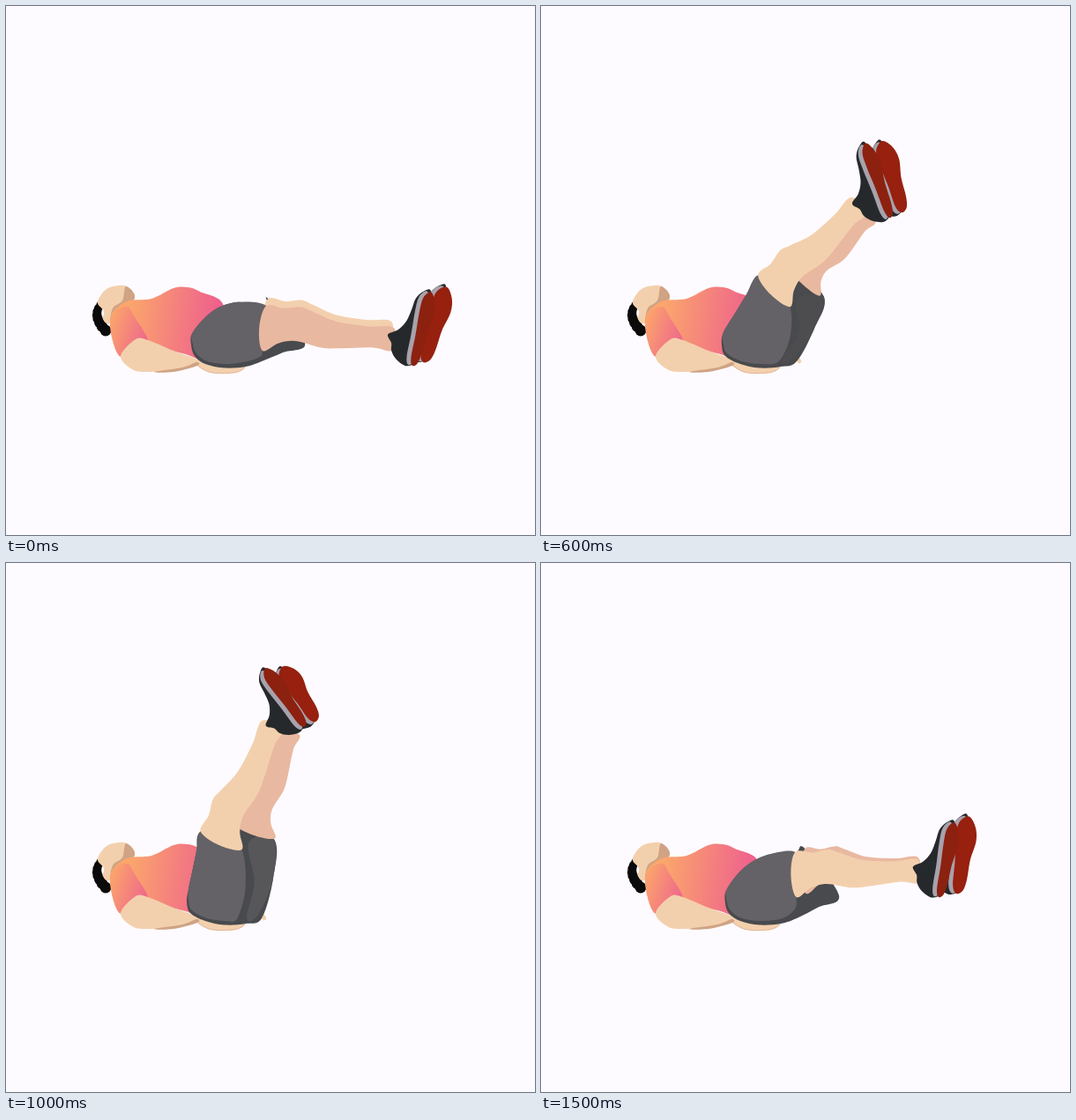
Write an HTML page with a canvas that moves like this. It is 600 px wide and 600 px high and loops after 1600 ms.

```html
<!DOCTYPE html>
<html lang="en">
<head>
<meta charset="utf-8">
<title>Lying leg raise</title>
<style>
html, body { margin: 0; width: 100%; height: 100%; overflow: hidden; background: #fdfbff; }
canvas { display: block; width: 600px; height: 600px; }
</style>
</head>
<body>
<canvas id="stage" width="600" height="600"></canvas>
<script>
const ctx = document.getElementById('stage').getContext('2d');
const SKIN = '#f3d0ad', BLUSH = '#e9b8a0', SHADE = '#cfa384', KNUCKLE = '#dba886';
const CLOTH = '#646267', INK = '#26292b', MIDSOLE = '#a7a2ac';
const LOOP = 1600, STEP = 100;

const pts = text => text.split(' ').map(p => p.split(',').map(Number));
const lerp = (a, b, k) => a + (b - a) * k;
const along = (p, q, k) => p.map((v, i) => lerp(v, q[i], k));
const shift = ([x, y], dx, dy) => [x + dx, y + dy];

// Joints of each pose; everything below the waist is built from these.
const flat = {
  near: BLUSH, far: SKIN, angle: 0, shade: 73,
  hem: [293, 366], farHem: [295, 358], farAnkle: [436, 371], tip: [339, 382],
  toe: [480, 324], heel: [461, 408], farToe: [497, 318], farHeel: [473, 404]
};
const low = {
  near: SKIN, far: BLUSH, angle: 9, shade: 73,
  hem: [289, 354], farHem: [300, 350], farAnkle: [428, 347], tip: [338, 377],
  toe: [467, 294], heel: [451, 379], farToe: [482, 287], farHeel: [471, 375]
};
const mid = {
  near: SKIN, far: BLUSH, angle: 38, shade: 84,
  hem: [274, 331], farHem: [300, 322], farAnkle: [390, 271], tip: [328, 346],
  toe: [405, 193], heel: [421, 283], farToe: [423, 190], farHeel: [434, 279]
};
const high = {
  near: SKIN, far: BLUSH, angle: 57, shade: 73,
  hem: [260, 320], farHem: [297, 306], farAnkle: [361, 219], tip: [317, 321],
  toe: [347, 138], heel: [383, 219], farToe: [365, 136], farHeel: [397, 212]
};
const upright = {
  near: SKIN, far: BLUSH, angle: 85, shade: 100,
  hem: [229, 310], farHem: [266, 302], farAnkle: [282, 163], tip: [290, 304],
  toe: [238, 103], heel: [294, 153], farToe: [258, 102], farHeel: [305, 148]
};

function mix(a, b, k) {
  const out = {};
  for (const key in a) {
    const v = a[key];
    out[key] = Array.isArray(v) ? along(v, b[key], k)
      : typeof v === 'number' ? lerp(v, b[key], k) : v;
  }
  return out;
}

const nearTop = mix(high, upright, 0.5);
const timeline = [
  flat, flat, low, low,
  mid, mix(mid, high, 1 / 3), mix(mid, high, 2 / 3), high,
  nearTop, upright, nearTop, high,
  mid, mid, mix(mid, low, 0.5), low
];

// Profiles: share of the axis, then pixels to its left when walking along it.
const LEG = pts('0,26 .14,25 .27,28 .36,24 .55,15 .8,12.5 1,13 1,-12 .85,-11 .6,-15 .45,-16 .25,-11 .12,-15 0,-25 -.04,0');
const SOLE = pts('0,3 .12,12 .3,15 .55,11 .8,10 .95,7 1,0 .9,-5 .6,-6 .3,-8 .1,-7');
const UPPER = pts('0,2 .01,-6 .12,-13 .28,-15 .45,-18 .58,-25 .67,-35 .77,-29 .87,-27 .97,-19 1.02,-6 .9,2 .4,2');

// Places a profile point on the axis from a to b.
function onAxis(a, b, [u, v]) {
  const dx = b[0] - a[0], dy = b[1] - a[1], len = Math.hypot(dx, dy);
  return [a[0] + dx * u + dy / len * v, a[1] + dy * u - dx / len * v];
}
const place = (a, b, profile, scale = 1, offset = 0) =>
  profile.map(([u, v]) => onAxis(a, b, [u, v * scale + offset]));

// Closed smooth curve through the points.
function shape(p, fill, edge) {
  const n = p.length, at = i => p[(i + n) % n];
  ctx.beginPath();
  ctx.moveTo(...p[0]);
  for (let i = 0; i < n; i++) {
    const [a, b, c, d] = [at(i - 1), at(i), at(i + 1), at(i + 2)];
    ctx.bezierCurveTo(b[0] + (c[0] - a[0]) / 6, b[1] + (c[1] - a[1]) / 6,
      c[0] - (d[0] - b[0]) / 6, c[1] - (d[1] - b[1]) / 6, c[0], c[1]);
  }
  ctx.fillStyle = fill;
  ctx.fill();
  if (edge) {
    ctx.strokeStyle = edge;
    ctx.lineWidth = 0.8;
    ctx.stroke();
  }
}

function fade(x0, y0, x1, y1, from, to) {
  const g = ctx.createLinearGradient(x0, y0, x1, y1);
  g.addColorStop(0, from);
  g.addColorStop(1, to);
  return g;
}

const torsoFill = fade(138, 352, 238, 366, '#fba66c', '#ee608d');
const sleeveFill = fade(118, 360, 160, 374, '#fba36c', '#ef698a');
const body = [
  [pts('104,337 109,326 118,319 134,317 139,323 146,332 130,346 117,360 110,355 111,346'), SKIN],
  [pts('136,318 146,331 124,350 118,360 121,343 132,334'), SHADE],
  [pts('119,352 137,335 165,332 190,320 206,319 220,324 247,341 232,398 200,394 165,385 128,375'), torsoFill],
  [pts('119,352 137,341 146,353 161,379 147,379 131,398 121,380'), sleeveFill],
  [pts('213,402 245,406 267,408 270,411 258,416 230,415'), SKIN, KNUCKLE],
  [pts('130,397 147,378 161,379 190,391 222,404 196,412 160,415 143,412'), SKIN],
  [pts('168,415 200,410 216,404 217,408 190,415'), SHADE]
];

function drawHair() {
  ctx.fillStyle = '#0c0b0b';
  for (let i = 0; i <= 7; i++) {
    const k = i / 7;
    const [x, y] = along(along([107, 339], [97, 352], k), along([97, 352], [113, 368], k), k);
    ctx.beginPath();
    ctx.arc(x, y, 4.5 + 2 * k, 0, 2 * Math.PI);
    ctx.fill();
  }
}

function drawFingers() {
  ctx.strokeStyle = SKIN;
  ctx.lineWidth = 4.5;
  ctx.lineCap = 'round';
  for (let i = 0; i < 3; i++) {
    ctx.beginPath();
    ctx.moveTo(276 + 6 * i, 399 - 2 * i);
    ctx.lineTo(280 + 6.5 * i, 405 - i);
    ctx.stroke();
  }
}

function drawShorts(p, ankle) {
  const front = onAxis(p.hem, ankle, [0, 26]);
  const back = onAxis(p.hem, ankle, [0, -25]);
  const farFront = onAxis(p.farHem, p.farAnkle, [0, 26]);
  const lift = p.angle / 85;
  const left = 211 - 5 * Math.min(1, p.angle / 38);
  const hip = [left + 1, 370];
  const bulge = 15 * Math.max(0, 1 - p.angle / 50);
  const waist = [0.33, 0.67].map(u => onAxis(front, hip, [u, -bulge]));
  const seam = [274 - 20 * lift ** 3, 403];
  const thigh = shift(along(seam, back, 0.45), 7, 0);
  const outer = shift(along([289, 404], p.tip, 0.5), 8 * lift, 0);

  const dark = [front, ...waist, hip, [left - 1, 384], [left + 3, 397], [226, 406],
    [248, 410.5], [272, 409], [290, 403], outer, p.tip, farFront];
  const panel = [p.tip, outer, [286, 399], [273, 403], shift(thigh, 10, -6), shift(back, 8, -8)];
  const light = [front, ...waist, hip, [left + 1, 384], [left + 5, 394], [228, 403],
    [250, 406], seam, thigh, back, p.hem];

  shape(dark, '#484a4d');
  if (p.angle > 30) shape(panel, `rgb(${p.shade},${p.shade},${p.shade + 3})`);
  shape(place(p.farHem, p.farAnkle, LEG), p.far);
  shape(light, CLOTH);
}

function drawShoe(toe, heel, width, red) {
  shape(place(toe, heel, UPPER), INK);
  shape(place(toe, heel, SOLE, width, -5), MIDSOLE);
  shape(place(toe, heel, SOLE, width), red);
}

function drawPose(p) {
  const ankle = onAxis(p.toe, p.heel, [0.72, -28]);
  if (p.angle > 30) drawFingers();
  drawShorts(p, ankle);
  shape(place(p.hem, ankle, LEG), p.near);
  drawShoe(p.farToe, p.farHeel, 1, '#97200f');
  drawShoe(p.toe, p.heel, 0.72, '#8c2110');
}

const start = performance.now();
function draw() {
  const t = Math.max(0, performance.now() - start) % LOOP;
  ctx.fillStyle = '#fdfbff';
  ctx.fillRect(0, 0, 600, 600);
  drawHair();
  body.forEach(part => shape(...part));
  drawPose(timeline[Math.floor(t / STEP)]);
  requestAnimationFrame(draw);
}
draw();
</script>
</body>
</html>
```
